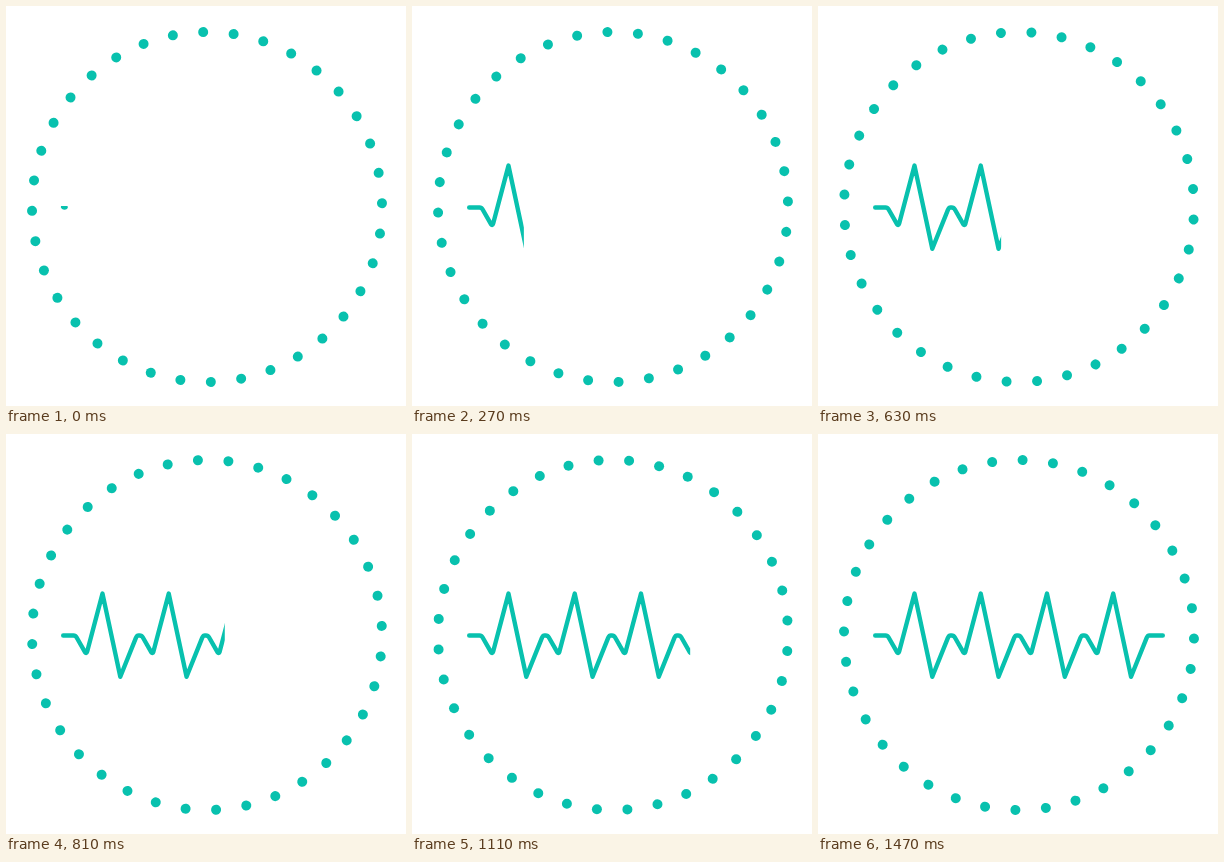
An HTML page that plays this animation: 400 px wide and 400 px high, repeating every 1.5 s.

```html
<!DOCTYPE html>
<html lang="en">
<head>
<meta charset="utf-8">
<title>Pulse</title>
<style>
  html, body { margin: 0; width: 100%; height: 100%; overflow: hidden; background: #fff; }
  svg { display: block; width: 100vw; height: 100vh; }
</style>
</head>
<body>
<svg viewBox="0 0 400 400">
  <defs>
    <clipPath id="reveal"><rect id="window" x="0" y="0" width="0" height="400"/></clipPath>
  </defs>
  <g id="ring" fill="#08c1ae"></g>
  <g clip-path="url(#reveal)">
    <path id="pulse" fill="none" stroke="#08c1ae" stroke-width="4.4" stroke-linecap="round" stroke-linejoin="round"/>
  </g>
  <path id="seed" fill="#08c1ae" d="M55 200H61.5Q62.5 201.5 61 203Q58.5 204.6 56 203Q54.2 201.5 55 200Z"/>
</svg>
<script>
const LOOP = 1500, STEP = 30;
const DOTS = 36, CENTER = 201, RADIUS = 175;
const BEATS = 4, BEAT = 66.25;
const SPIN = -1.175, SPIN_START = -1.25;
const SWEEP = 5.94, SWEEP_START = 58.4;

const $ = id => document.getElementById(id);
const ring = $('ring'), reveal = $('window'), pulse = $('pulse'), seed = $('seed');

for (let i = 0; i < DOTS; i++) {
  const a = i * 2 * Math.PI / DOTS;
  const dot = document.createElementNS('http://www.w3.org/2000/svg', 'circle');
  dot.setAttribute('cx', CENTER + RADIUS * Math.sin(a));
  dot.setAttribute('cy', CENTER - RADIUS * Math.cos(a));
  dot.setAttribute('r', 5);
  ring.append(dot);
}

// One heartbeat: dip, peak, trough, then back to the baseline.
function beat(x) {
  return `H${x + 67.5}Q${x + 69.5} 201.5 ${x + 70.5} 203.3` +
    `L${x + 79} 218.2Q${x + 80.4} 220.2 ${x + 81.2} 217.5` +
    `L${x + 96.5} 159.6L${x + 114.3} 242.8` +
    `L${x + 130} 203.6Q${x + 131} 201.5 ${x + 132.5} 201.5`;
}

let d = 'M57.2 201.5';
for (let i = 0; i < BEATS; i++) d += beat(i * BEAT);
pulse.setAttribute('d', d + 'H344.8');

function draw(now) {
  const n = Math.floor((now % LOOP) / STEP);
  ring.setAttribute('transform', `rotate(${SPIN_START + SPIN * n} ${CENTER} ${CENTER})`);
  reveal.setAttribute('width', n ? SWEEP_START + SWEEP * n : 0);
  seed.style.display = n ? 'none' : '';
}

const start = performance.now();
function tick() {
  draw(performance.now() - start);
  requestAnimationFrame(tick);
}
tick();
</script>
</body>
</html>
```
